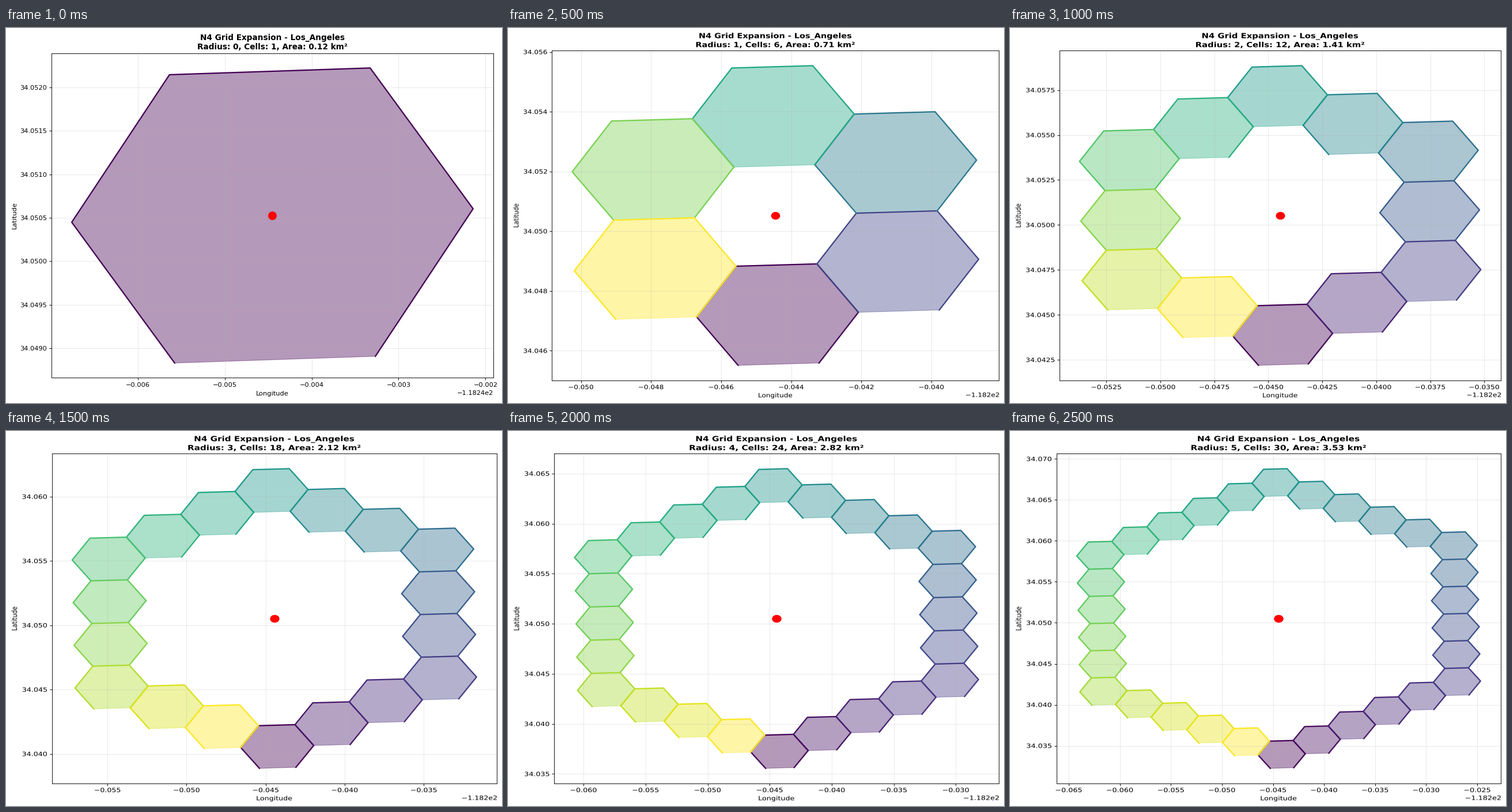
Animation of 861x650 px, one loop 3 s. Source, as a matplotlib script:

```python
import numpy as np
import matplotlib.pyplot as plt
from matplotlib.animation import FuncAnimation
from matplotlib.markers import MarkerStyle
from matplotlib.patches import PathPatch
from matplotlib.textpath import TextPath
from matplotlib.transforms import Affine2D

W, H, DPI = 861, 650, 82
PX = DPI / 72  # pixels per point
plt.rcParams["font.family"] = "DejaVu Sans"

# Lattice steps in degrees: to the cell above and to the upper right cell
CENTER = np.array([-118.244451, 34.050527])
UP = np.array([-0.000060, 0.003317])
RIGHT = np.array([0.003432, 0.001775])
CORNERS = [-UP, RIGHT - UP, RIGHT, UP, UP - RIGHT, -RIGHT]

# Cell outline, open along its lower side
V1 = (UP + RIGHT) / 3
V2 = (2 * RIGHT - UP) / 3
V0 = V1 - V2
OUTLINE = np.array([-V1, -V2, V0, V1, V2, -V0])

CELL_KM2 = 0.1176

# Page layout in pixels before the page is stretched to the stage
PAD = 0.1 * DPI
MARGIN_Y = 43.7    # above and below the axes
LABEL_SPACE = 32.1  # left of the axes, without the tick labels
DIGIT = 7.25
OVERHANG = 7.1     # last tick label past the axes on the first page
SQUEEZE = 0.9      # vertical scale of the ring pages

fig = plt.figure(figsize=(W / DPI, H / DPI), dpi=DPI, facecolor="white")


def ring(radius):
    """Cell centres counterclockwise from the lowest cell."""
    if radius == 0:
        return [CENTER]
    return [
        CENTER + radius * a + j * (b - a)
        for a, b in zip(CORNERS, CORNERS[1:] + CORNERS[:1])
        for j in range(radius)
    ]


def visible_ticks(axis):
    low, high = axis.get_view_interval()
    ticks = axis.get_majorticklocs()
    labels = axis.get_major_formatter().format_ticks(ticks)
    return [(t, s) for t, s in zip(ticks, labels) if low <= t <= high]


def layout(ax, radius):
    """Place equal-aspect axes on a page stretched to fill the stage."""
    digits = max(len(s) for _, s in visible_ticks(ax.yaxis)) - 0.5
    margin = LABEL_SPACE + digits * DIGIT
    sx = sy = 1
    right = W - PAD - OVERHANG
    if radius:
        sy = SQUEEZE
        height = H / sy - 2 * MARGIN_Y
        width = height * np.ptp(ax.get_xlim()) / np.ptp(ax.get_ylim())
        sx = W / (margin + width + PAD)
        right = W - PAD * sx
    left, top, bottom = margin * sx, MARGIN_Y * sy, H - MARGIN_Y * sy
    ax.set_position([left / W, 1 - bottom / H,
                     (right - left) / W, (bottom - top) / H])
    return (left, top, right, bottom), (sx, sy)


def stamp(text, x, y, scale, ha=0.5, size=10, weight="normal", turn=0):
    """Text on a baseline at pixel (x, y), stretched with the page."""
    path = TextPath((0, 0), text, size=size * PX,
                    prop={"family": "DejaVu Sans", "weight": weight})
    box = path.get_extents()
    place = (Affine2D().translate(-box.x0 - ha * box.width, 0)
             .rotate_deg(turn).scale(*scale).translate(x, H - y))
    fig.add_artist(PathPatch(path, fc="black", lw=0, transform=place))


def stretched_labels(ax, box, scale, title):
    left, top, right, bottom = box
    sx, sy = scale
    mid_x, mid_y = (left + right) / 2, (top + bottom) / 2
    (x0, x1), (y0, y1) = ax.get_xlim(), ax.get_ylim()

    for value, text in visible_ticks(ax.xaxis):
        x = left + (value - x0) / (x1 - x0) * (right - left)
        stamp(text, x, bottom + 17 * sy, scale)
    for value, text in visible_ticks(ax.yaxis):
        y = bottom - (value - y0) / (y1 - y0) * (bottom - top)
        stamp(text, left - 7 * PX * sx, y + 4.15 * sy, scale, ha=1)

    offset = ax.xaxis.get_major_formatter().get_offset()
    stamp(offset, right, bottom + 32 * sy, scale, ha=1)
    stamp("Longitude", mid_x, bottom + 32.8 * sy, scale)
    stamp("Latitude", 17.2 * sx, mid_y, scale, turn=90)
    for line, rise in zip(title.split("\n"), (24.1, 6.8)):
        stamp(line, mid_x, top - rise * sy, scale, size=12, weight="bold")

    ax.tick_params("x", length=3.5 * sy, labelbottom=False)
    ax.tick_params("y", length=3.5 * sx, labelleft=False)
    ax.xaxis.offsetText.set_visible(False)
    ax.yaxis.offsetText.set_visible(False)


def draw(radius):
    fig.clear()
    ax = fig.add_axes([0.1, 0.06, 0.89, 0.87])

    cells = ring(radius)
    for cell, color in zip(cells, plt.cm.viridis(np.linspace(0, 1, len(cells)))):
        x, y = (cell + OUTLINE).T
        ax.fill(x, y, color=color, alpha=0.4)
        ax.plot(x, y, color=color, lw=2)
    ax.grid(True, alpha=0.3)

    box, scale = layout(ax, radius)
    dot = MarkerStyle("o", transform=Affine2D().scale(*scale))
    ax.plot(*CENTER, marker=dot, ms=12, color="red", zorder=5)

    title = ("N4 Grid Expansion - Los_Angeles\n"
             f"Radius: {radius}, Cells: {len(cells)}, "
             f"Area: {len(cells) * CELL_KM2:.2f} km²")
    if radius:
        stretched_labels(ax, box, scale, title)
    else:
        ax.set_title(title, fontsize=12, fontweight="bold")
        ax.set_xlabel("Longitude")
        ax.set_ylabel("Latitude")


anim = FuncAnimation(fig, draw, frames=6, interval=500, repeat=True,
                     repeat_delay=0)
plt.show()
```
